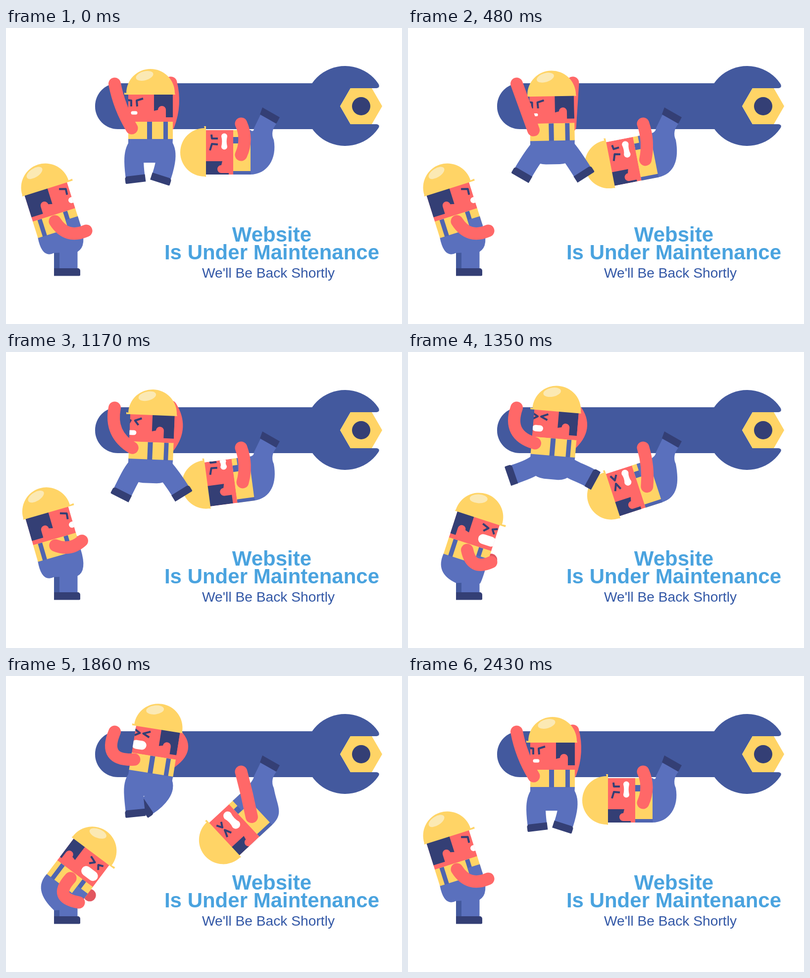
Recreate the animation shown at these times as an HTML page with a canvas. Size 800 by 600 pixels, loop 2700 ms.

```html
<!DOCTYPE html>
<html lang="en">
<head>
<meta charset="utf-8">
<title>Under Maintenance</title>
<style>
  html, body { margin: 0; width: 100%; height: 100%; overflow: hidden; background: #fff; }
  canvas, svg { position: absolute; left: 0; top: 0; width: 800px; height: 600px; }
  text { font-family: "Liberation Sans", Arial, sans-serif; text-anchor: middle; }
  .big { font-size: 42px; font-weight: bold; fill: #4aa3df; }
  .small { font-size: 28.2px; fill: #3257a6; }
</style>
</head>
<body>
<canvas id="stage" width="800" height="600"></canvas>
<svg viewBox="0 0 800 600">
  <text class="big" x="537" y="433">Website</text>
  <text class="big" x="537" y="469">Is Under Maintenance</text>
  <text class="small" x="530" y="505.5">We'll Be Back Shortly</text>
</svg>
<script>
const LOOP = 2700, STEP = 30;
const RED = '#ff6868', SHADE = '#e2565f', GOLD = '#ffd466', SHINE = '#fbe9b4';
const BLUE = '#5a70bd', STRAP = '#4e64b0', STEEL = '#43599e', NAVY = '#343f75';
const c = document.getElementById('stage').getContext('2d');

// Key points: time, then values
const lift = [[0, 0], [240, .85], [480, -.12], [960, 0], [1350, .53], [1860, 1], [2160, .1], [2430, 0]];
const drop = [[0, 0], [270, 19], [480, 11], [960, 0], [1350, 18], [1860, 43], [2160, 30], [2430, 0]];
const lean = [[0, -17.5], [570, -17.5], [960, -22], [1035, -35], [1350, 18], [1860, 37], [2130, -17.5]];
const reach = [[0, 162, 411], [570, 162, 411], [960, 135, 340], [1350, 168, 426], [1860, 147, 459], [2130, 162, 411]];
// Outward swing of the left and right leg, in degrees
const swing = [[0, 5, -4], [240, 75, 68], [480, 36, 38], [960, -13, 6], [1350, 70, 62],
  [1860, 6, -36], [2160, 83, 72], [2430, 5, -4]];

// Smooth interpolation that never overshoots a key
function slope(keys, i, k) {
  const a = keys[i - 1], b = keys[i], n = keys[i + 1];
  if (!a || !n) return 0;
  const d = (b[k] - a[k]) / (b[0] - a[0]), e = (n[k] - b[k]) / (n[0] - b[0]);
  return d * e <= 0 ? 0 : 2 * d * e / (d + e);
}
function sample(keys, t) {
  const next = keys.findIndex(p => p[0] > t);
  if (next < 0) return keys[keys.length - 1].slice(1);
  const a = keys[next - 1], b = keys[next], h = b[0] - a[0], u = (t - a[0]) / h, v = 1 - u;
  return a.map((p, k) =>
    v * v * (1 + 2 * u) * p + u * v * v * h * slope(keys, next - 1, k) +
    u * u * (3 - 2 * u) * b[k] - u * u * v * h * slope(keys, next, k)).slice(1);
}

const rad = d => d * Math.PI / 180;
const mix = (a, b, u) => a + (b - a) * u;
const clamp = u => Math.min(1, Math.max(0, u));
// The hanging workers look away for a moment
const lookAway = t => Math.exp(-(((t - 960) / 300) ** 2));

function fill(color, draw) {
  c.beginPath();
  draw();
  c.fillStyle = color;
  c.fill();
}
function box(color, x0, y0, x1, y1) {
  c.fillStyle = color;
  c.fillRect(x0, y0, x1 - x0, y1 - y0);
}
const disc = (color, x, y, r) => fill(color, () => c.arc(x, y, r, 0, 7));
const poly = (color, pts) => fill(color, () => pts.forEach(p => c.lineTo(...p)));

// An arm whose middle is pushed sideways by bend
function arm(hand, shoulder, bend) {
  const dx = shoulder[0] - hand[0], dy = shoulder[1] - hand[1], k = bend / Math.hypot(dx, dy);
  c.beginPath();
  c.moveTo(...hand);
  c.quadraticCurveTo((hand[0] + shoulder[0]) / 2 - dy * k, (hand[1] + shoulder[1]) / 2 + dx * k, ...shoulder);
  c.strokeStyle = RED;
  c.lineWidth = 25;
  c.lineCap = 'round';
  c.stroke();
}
// How far an arm of the given length must bow out
const slack = (a, b, length) => Math.sqrt(Math.max(0, length ** 2 - (a[0] - b[0]) ** 2 - (a[1] - b[1]) ** 2));

function place(b) {
  const s = Math.sin(rad(b.tilt)), k = Math.cos(rad(b.tilt));
  b.at = (x, y) => [b.x + b.flip * x * k - y * s, b.y + b.flip * x * s + y * k];
  return b;
}

function drawEye(x, y, rest, tight, q) {
  c.beginPath();
  rest.forEach((p, i) => c.lineTo(x + mix(p[0], tight[i][0], q), y + mix(p[1], tight[i][1], q)));
  c.stroke();
}

function drawMouth(x, y, w, h, pinch) {
  const r = Math.min(w, h) / 2, a = w / 2 - r, p = h / 2 * (1 - pinch);
  fill('#fff', () => {
    c.moveTo(x - a, y - h / 2);
    c.quadraticCurveTo(x, y - p, x + a, y - h / 2);
    c.ellipse(x + a, y, r, h / 2, 0, -Math.PI / 2, Math.PI / 2);
    c.quadraticCurveTo(x, y + p, x - a, y + h / 2);
    c.ellipse(x - a, y, r, h / 2, 0, Math.PI / 2, Math.PI * 1.5);
  });
}

// Torso, head and helmet; the face looks towards negative x
function drawBody(b, { straps, bib, shine, pinch = 0, brim = 53 }) {
  const edge = 45 - b.hair;
  c.save();
  c.translate(b.x, b.y);
  c.rotate(rad(b.tilt));
  c.scale(b.flip, 1);

  box(GOLD, -45, -36, 45, 0);
  straps.forEach(([l, r]) => box(STRAP, l, -35, r, .5));
  if (bib) box(BLUE, -45, bib, straps[0][1], 1);

  c.save();
  c.beginPath();
  c.rect(-45, -91, 90, 56);
  c.clip();
  box(RED, -45, -91, 45, -35);
  fill(NAVY, () => {
    c.moveTo(edge, -91);
    c.lineTo(45, -91);
    c.lineTo(45, -44);
    c.lineTo(edge + 24, -44);
    c.lineTo(edge + 24, -59);
    c.arc(edge + 16, -59, 8, 0, Math.PI, true);
    c.lineTo(edge, -57);
  });
  c.strokeStyle = NAVY;
  c.lineWidth = 4;
  c.lineCap = 'butt';
  c.lineJoin = 'round';
  drawEye(edge - 46, -78, [[-8, -1], [0, 0], [0, 12]], [[-7, -5], [4, 1], [-6, 7]], b.squint);
  drawEye(edge - 35, -78, [[13, -4], [0, 0], [1, 12]], [[14, -5], [0, 1], [13, 7]], b.squint);
  drawMouth(edge - 40, -53, ...b.mouth, pinch);
  c.restore();

  fill(GOLD, () => {
    c.arc(0, -93, 49, Math.PI, 0);
    c.lineTo(50, -90);
    c.lineTo(-brim, -90);
    c.lineTo(-brim, -94);
  });
  if (shine) fill(SHINE, () => c.ellipse(12 * shine, -128, 18, 9, .27 * shine, 0, 7));
  c.restore();
}

// A leg swings out from the hip on one side (-1 left, 1 right)
function drawLeg(b, side, degrees) {
  const x = b.x + side * (25 + 62 * Math.sin(rad(degrees)));
  const y = b.y + 18 + 63 * Math.cos(rad(degrees));
  const turn = -side * rad(1.2 * degrees - 13), ux = Math.sin(turn), uy = -Math.cos(turn);
  c.beginPath();
  c.moveTo(...b.at(side * 25, 14));
  c.bezierCurveTo(...b.at(side * 36, 26), x + 31 * ux, y + 31 * uy, x + 6 * ux, y + 6 * uy);
  c.strokeStyle = BLUE;
  c.lineWidth = 39;
  c.lineCap = 'butt';
  c.stroke();

  c.save();
  c.translate(x, y);
  c.rotate(turn);
  c.scale(side, 1);
  fill(NAVY, () => c.roundRect(-20, -7, 41, 15, [0, 5, 2, 0]));
  c.restore();
}

function drawClimber(t) {
  const [up] = sample(lift, t), [left, right] = sample(swing, t);
  const b = place({
    x: 292 + up, y: 225 - 28 * up, tilt: 9 * up, flip: 1,
    hair: 38 + 11 * lookAway(t), squint: clamp(2 * up), mouth: [13 + 17 * up, 7 + 11 * up]
  });
  const farHand = [333, 111], nearHand = [219.5, 113];
  const far = b.at(36, -28), near = b.at(-38, -22);
  arm(farHand, far, -.75 * slack(farHand, far, 88));
  fill(BLUE, () => {
    c.moveTo(...b.at(-45, -1));
    c.lineTo(...b.at(45, -1));
    c.lineTo(...b.at(44, 18));
    c.quadraticCurveTo(...b.at(42, 47), ...b.at(14, 48));
    c.lineTo(...b.at(-14, 48));
    c.quadraticCurveTo(...b.at(-42, 47), ...b.at(-45, 18));
  });
  drawLeg(b, 1, right);
  drawLeg(b, -1, left);
  drawBody(b, { straps: [[-7, 3], [26, 35]], shine: -1 });
  arm(nearHand, near, .8 * slack(nearHand, near, 97));
}

function drawHanger(t) {
  const [down] = sample(drop, t), away = lookAway(t);
  const b = place({
    x: 494 + .3 * down, y: 252 + 17 * Math.sin(rad(2 * down)), tilt: -90 - down, flip: -1,
    hair: 27 - .1 * down + 25 * away, squint: clamp((down - 10) / 8),
    mouth: [33 + .2 * down - 19 * away, 12 + .13 * down]
  });
  const hand = [475, 194], shoulder = b.at(5, -19);
  fill(BLUE, () => {
    c.moveTo(...b.at(-45, -1));
    c.quadraticCurveTo(501, 212, 501, 203);
    c.lineTo(514, 176);
    c.lineTo(547, 193);
    c.quadraticCurveTo(533, 210, 541, 227);
    c.bezierCurveTo(548, 265, ...b.at(45, 34), ...b.at(45, -1));
  });
  poly(NAVY, [[518, 161], [553, 181], [546, 194], [513, 175]]);
  drawBody(b, { straps: [[-31, -18], [38, 45]], bib: -25, pinch: .45 });
  arm(hand, shoulder, -.4 * Math.max(0, 98 - Math.hypot(shoulder[0] - hand[0], shoulder[1] - hand[1])));
}

function drawPuller(t) {
  const [tilt] = sample(lean, t), hand = sample(reach, t);
  const effort = clamp((tilt + 17) / 35), active = clamp(Math.abs(tilt + 17.5) / 4);
  const b = place({
    x: 111 + .2 * tilt, y: 417.5 + .3 * tilt, tilt, flip: -1,
    hair: 42 - .37 * tilt, squint: .6 * effort, mouth: [14 + 23 * effort, 12 + 8 * effort]
  });
  const hem = 462 + .35 * tilt;
  disc(SHADE, ...b.at(-32 - 18 * active, -18), 12.5);
  box(STEEL, 97, hem - 8, 109, 488);
  box(BLUE, 108, hem - 12, 144.5, 488);
  fill(BLUE, () => {
    c.moveTo(...b.at(45, -1));
    c.quadraticCurveTo(...b.at(50, 43), 97, hem);
    c.lineTo(144, hem - 2);
    c.quadraticCurveTo(...b.at(-46, 46), ...b.at(-45, -1));
  });
  fill(NAVY, () => c.roundRect(97, 487, 53, 15.5, [0, 5, 2, 0]));
  drawBody(b, { straps: [[-28, -19], [26, 35]], bib: -18, shine: 1, brim: 57 });
  arm(hand, b.at(2, -22), -.4 * (hand[1] - 340));
}

function drawWrench() {
  const tip = Math.acos(67 / 81);
  fill(STEEL, () => c.roundRect(180, 112, 470, 93, [46, 0, 0, 46]));
  fill(STEEL, () => {
    c.arc(685, 158, 81, tip, 2 * Math.PI - tip);
    c.quadraticCurveTo(757, 121, 748, 122);
    c.lineTo(696, 122);
    c.lineTo(675, 158.5);
    c.lineTo(696, 195);
    c.lineTo(748, 195);
    c.quadraticCurveTo(757, 196, 752, 203.5);
  });
  poly(GOLD, [[675, 158.5], [696, 122], [739, 122], [760, 158.5], [739, 195], [696, 195]]);
  disc(NAVY, 717.5, 158.5, 18.5);
}

function render(now) {
  const t = Math.floor(now % LOOP / STEP) * STEP;
  c.clearRect(0, 0, 800, 600);
  drawWrench();
  drawHanger(t);
  drawClimber(t);
  drawPuller(t);
}

let start;
function tick(now) {
  start ??= now;
  render(now - start);
  requestAnimationFrame(tick);
}
render(0);
requestAnimationFrame(tick);
</script>
</body>
</html>
```
